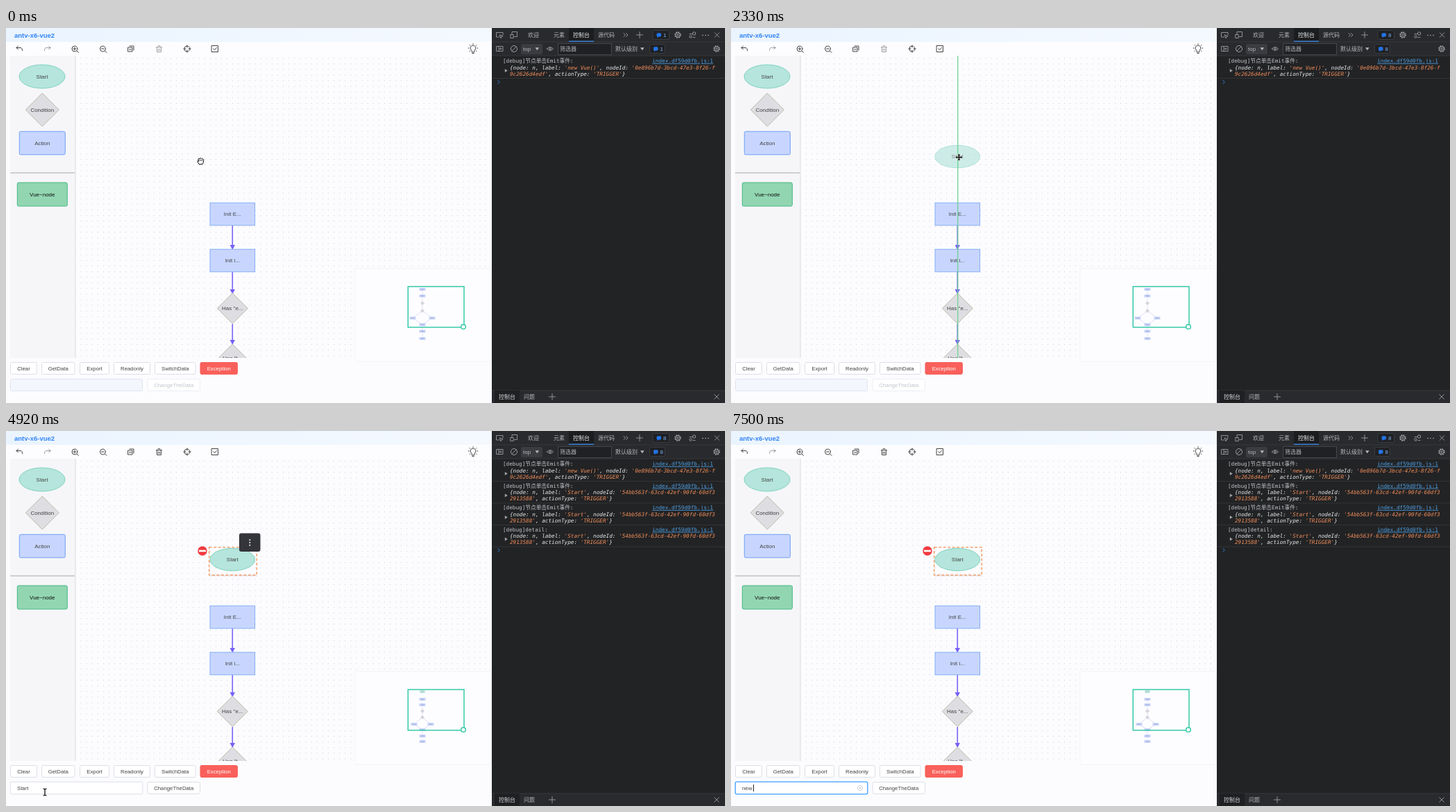
Animation, 1036 px wide and 541 px high, one loop 8000 ms. Source, as an HTML page:

```html
<!DOCTYPE html>
<html lang="en">
<head>
<meta charset="utf-8">
<title>antv-x6-vue2</title>
<style>
html, body { margin: 0; width: 100%; height: 100%; overflow: hidden; background: #fcfcff; }
svg { display: block; }
text { font-family: 'Liberation Sans', 'Noto Sans CJK SC', 'Noto Sans CJK', sans-serif; white-space: pre; }
.mono { font-family: 'DejaVu Sans Mono', 'Noto Sans CJK SC', 'Noto Sans CJK', monospace; }
.icon { fill: none; stroke: #444; stroke-width: 1; stroke-linecap: round; stroke-linejoin: round; }
.dark { stroke: #9a9da1; stroke-width: .9; }
</style>
</head>
<body>
<svg id="stage" width="1036" height="541" viewBox="0 0 1036 541" xmlns="http://www.w3.org/2000/svg"></svg>
<script>
const LOOP = 8000;
const BLUE = ['#c8d6ff', '#84aef5'], GRAY = ['#dedee2', '#b9b9a9'], MINT = ['#b5e5dc', '#7dd3bf'];

// Drawing helpers
const rect = (x, y, w, h, fill, stroke = 'none', r = 0, extra = '') =>
  `<rect x="${x}" y="${y}" width="${w}" height="${h}" rx="${r}" fill="${fill}" stroke="${stroke}" ${extra}/>`;
const circle = (x, y, r, fill, stroke = 'none', extra = '') =>
  `<circle cx="${x}" cy="${y}" r="${r}" fill="${fill}" stroke="${stroke}" ${extra}/>`;
const text = (x, y, s, fill = '#444', size = 8, extra = '') =>
  `<text x="${x}" y="${y + size * .35}" font-size="${size}" fill="${fill}" ${extra}>${s}</text>`;
const label = (x, y, s, fill, size) => text(x, y, s, fill, size, 'text-anchor="middle"');
const path = (d, cls = 'icon', extra = '') => `<path d="${d}" class="${cls}" ${extra}/>`;
const at = (x, y, body) => `<g transform="translate(${x} ${y})">${body}</g>`;
const group = (id, body, extra = '') => `<g id="${id}" ${extra}>${body}</g>`;

// Flow shapes
const box = (x, y, w, h, s, [fill, stroke] = BLUE, r = 0, ink = '#444') =>
  rect(x - w / 2, y - h / 2, w, h, fill, stroke, r) + label(x, y, s, ink);
const diamond = (x, y, r, s, labelY = y) =>
  `<path d="M${x} ${y - r}l${r} ${r}l${-r} ${r}l${-r} ${-r}z" fill="${GRAY[0]}" stroke="${GRAY[1]}"/>` + label(x, labelY, s);
const oval = (x, y, rx, ry, s, id = '') =>
  `<ellipse cx="${x}" cy="${y}" rx="${rx}" ry="${ry}" fill="${MINT[0]}" stroke="${MINT[1]}"/>` +
  (id ? group(id, label(x, y, s)) : label(x, y, s));
const edge = (y1, y2) =>
  `<path d="M326.3 ${y1}V${y2 - 5}" stroke="#7561f7" stroke-width="1.6"/>` +
  `<path d="M322.6 ${y2 - 7}h7.4l-3.7 7z" fill="#7561f7"/>`;

function header() {
  const undo = 'M-4 -1.5h6q2.5 0 2.5 4M-4 -1.5l2.5 -2.3M-4 -1.5l2.5 2.3';
  const lens = 'M3 3l2.5 2.5M4 0a4 4 0 1 1 -8 0a4 4 0 1 1 8 0M-2 0h4';
  return rect(0, 0, 700, 20, 'url(#bar)') + rect(0, 20, 700, 20, '#fdfdff') +
    text(12, 11, 'antv-x6-vue2', '#3385f5', 9.5, 'font-weight="600"') +
    at(19, 30, path(undo)) + at(60, 30, path(undo, 'icon', 'transform="scale(-1 1)" opacity=".5"')) +
    at(99, 30, path(lens + 'M0 -2v4')) + at(139.5, 30, path(lens)) +
    at(180, 30, path('M-4 -2h6v6h-6zM-2 -4h6v6M-2.5 1h3')) +
    group('trash', at(220.5, 30, path('M-4 -2.5h8M-1.5 -4.3h3M-3 -2.5v7h6v-7M-1 0v2.5M1 0v2.5'))) +
    at(261, 30, path('M4 0a4 4 0 1 1 -8 0a4 4 0 1 1 8 0M0 -5.2v3.2M0 5.2v-3.2M-5.2 0h3.2M5.2 0h-3.2')) +
    at(301, 30, path('M-4.5 -4.5h9v9h-9zM-2.2 -.2l1.7 1.8l3 -3.3')) +
    at(673, 30, path('M-1.8 4.5v-2.2a3.8 3.8 0 1 1 3.6 0v2.2zM-1.2 6.5h2.4M-6.8 -1h1M5.8 -1h1M-5 -5.5l.8 .8M5 -5.5l-.8 .8M0 -7.3v1M-5 3.5l.8 -.7M5 3.5l-.8 -.7'));
}

function palette() {
  return rect(99, 40, 2, 436, '#e9e9ee') + rect(6, 40, 93, 436, '#f6f6f9') +
    oval(52, 70, 33, 17, 'Start') + diamond(52.3, 118, 24, 'Condition') +
    box(52.3, 166, 66, 33.5, 'Action', ['#c8d6ff', '#6f9ff5'], 2) +
    rect(6, 208.5, 93, 1, '#a9a9ab') + box(52.3, 240, 72, 34, 'Vue−node', ['#92d6b1', '#45b883'], 2, '#111');
}

function flow() {
  return rect(101, 40, 598, 436, 'url(#dots)') +
    `<g clip-path="url(#canvas)">` + edge(285, 320) + edge(352, 384) + edge(427, 457) +
    box(326.3, 268.5, 64.5, 32.5, 'Init E...') + box(326.3, 335.5, 64.5, 32.5, 'Init i...') +
    diamond(326.3, 404.5, 22, 'Has "e...') + diamond(326.3, 478, 22, 'Has "t...', 476.5) + '</g>';
}

function miniature(start) {
  const ys = start ? [387, 395, 404, 413, 423, 431, 440, 448] : [377, 386.5, 397, 408, 418.5, 428, 437.5, 448];
  const dx = start ? 12 : 14;
  const chip = (x, y) => rect(x - 4.5, y - 2, 9, 4, '#c9d5fa') + rect(x - 2.5, y - .5, 5, 1, '#9ba9d5');
  const gem = y => `<path d="M600 ${y - 3}l3 3l-3 3l-3 -3z" fill="#d5d5dc"/>`;
  return `<path d="M600 ${ys[0]}V${ys[3]}M600 ${ys[5]}V${ys[7]}" stroke="#dcd8f8" stroke-width=".7"/>` +
    `<path d="M600 ${ys[3]}l${dx} ${ys[4] - ys[3]}l${-dx} ${ys[5] - ys[4]}l${-dx} ${ys[4] - ys[5]}z" fill="none" stroke="#d6d2f5" stroke-width=".7"/>` +
    (start ? `<ellipse cx="600" cy="376" rx="4" ry="2" fill="#b5dcd5"/>` : '') +
    chip(600, ys[0]) + chip(600, ys[1]) + gem(ys[2]) + gem(ys[3]) +
    chip(600 - dx, ys[4]) + chip(600 + dx, ys[4]) + [5, 6, 7].map(i => chip(600, ys[i])).join('');
}

function minimap() {
  return rect(503, 347, 196, 134, '#fdfdff', '#f3f3f7') +
    group('mapBefore', miniature(false)) + group('mapAfter', miniature(true)) +
    rect(579.3, 373, 80.7, 58.7, 'none', '#35c9a8', 0, 'stroke-width="1.5"') +
    circle(659, 431, 3.3, '#fff', '#35c9a8', 'stroke-width="1.5"');
}

function button(x, w, s, y = 482, colors = ['#fff', '#dcdfe6', '#444']) {
  return rect(x + .5, y + .5, w - 1, 17, colors[0], colors[1], 2) + label(x + w / 2, y + 9, s, colors[2], 7.8);
}

function footer() {
  return rect(0, 476, 503, 65, '#fcfcff') +
    button(6, 39, 'Clear') + button(51, 48.5, 'GetData') + button(106, 43, 'Export') +
    button(155, 53, 'Readonly') + button(214, 59.5, 'SwitchData') +
    button(279.5, 54.5, 'Exception', 482, ['#f9605b', '#f9605b', '#fff']) +
    group('idle', rect(6.5, 506.5, 190, 17, '#f3f6fd', '#dfe4f0', 2) +
      button(203.5, 76.5, 'ChangeTheData', 506, ['#fff', '#ebeef5', '#c0c4cc'])) +
    group('active', rect(6.2, 506.2, 190.6, 17.6, '#fff', 'none', 2, 'id="field"') +
      button(203.5, 76.5, 'ChangeTheData', 506) +
      rect(16, 506.8, 17, 16.5, '#b4d6fd', 'none', 0, 'id="highlight"') +
      `<text id="value" x="16" y="517.9" font-size="7.8" fill="#444"></text>` +
      rect(0, 510, 1, 10, '#222', 'none', 0, 'id="caret"') +
      group('clear', circle(186, 515, 3.6, 'none', '#c0c4cc', 'stroke-width=".8"') +
        path('M184.7 513.7l2.6 2.6M187.3 513.7l-2.6 2.6', 'icon', 'style="stroke:#c0c4cc;stroke-width:.8"')));
}

function logEntry(i, title, lines) {
  const y = 47.5 + i * 31.5, mono = 'class="mono"';
  const paint = (s, re) => s.replace(re, m => `<tspan fill="#f28f5b">${m}</tspan>`);
  const row = (dy, s) => text(726, y + dy, s, '#e8eaec', 7.68, mono + ' font-style="italic"');
  return group('log' + i, text(716, y, title, '#c0c3c7', 7.68, mono) +
    text(1019, y, 'index.df59d0fb.js:1', '#4f9fe3', 7.68, mono + ' text-anchor="end" text-decoration="underline"') +
    `<path d="M718.8 ${y + 11.5}l4 2.5l-4 2.5z" fill="#a0a3a7"/>` +
    row(9.5, paint(lines[0], /'[^']*('|$)/g)) + row(18.5, paint(lines[1], /^[^']*'|'[^']*'/g)) +
    rect(700, y + 24.5, 336, 1, '#323437'));
}

function devtools() {
  const d = 'icon dark', ink = '#b4b7bb';
  const gear = circle(0, 0, 3.9, 'none', '#9a9da1', 'stroke-width="1.8" stroke-dasharray="1.8 1.26"') +
    circle(0, 0, 3.2, 'none', '#9a9da1', 'stroke-width=".9"') + circle(0, 0, 1.2, 'none', '#9a9da1', 'stroke-width=".9"');
  const cross = path('M-3.3 -3.3l6.6 6.6M3.3 -3.3l-6.6 6.6', d), plus = path('M-4.5 0h9M0 -4.5v9', d);
  const badge = (x, y, w) => rect(x + .5, y - 6.5, w, 13, '#202124', '#3a3d41', 2) +
    rect(x + 6, y - 2.8, 6.5, 5.2, '#2274e8', 'none', 1.5) + `<path d="M${x + 7} ${y + 1}v3l3 -2z" fill="#2274e8"/>` +
    text(x + 15.5, y + .2, '', '#7fb2f5', 8, 'data-count="1"');
  const clicked = '[debug]节点单击Emit事件:';
  const start = ["{node: n, label: 'Start', nodeId: '54bb563f-63cd-42ef-90fd-60df3", "2913588', actionType: 'TRIGGER'}"];
  return rect(700, 0, 336, 541, '#222325') + rect(700, 0, 336, 40, '#292a2d') +
    rect(700, 19.5, 336, 1, '#37393c') + rect(700, 39.5, 336, 1, '#37393c') +
    rect(811, 0, 36, 19, '#1c1d1f') + rect(811, 18.5, 36, 1.3, '#3f8cf0') +
    at(711.5, 10, path('M-1 3h-4v-6.5h9.5v3.5M0 0l4.5 1.7l-2 .8l-.8 2z', d)) +
    at(732, 10, path('M-3 -1v-3.5h7.5v7h-4M-4.8 -.5h4v5h-4z', d)) +
    text(752, 10, '欢迎', ink) + text(789, 10, '元素', ink) + text(817, 10, '控制台', '#e3e5e8') + text(853, 10, '源代码', ink) +
    at(893, 10, path('M-3 -2.5l2.5 2.5l-2.5 2.5M.5 -2.5l2.5 2.5l-2.5 2.5', d)) + at(913, 10, plus) +
    badge(931.5, 10, 23.5) + at(968, 10, gear) +
    at(989, 10, circle(2.5, -2, 2.2, 'none', '#9a9da1') + circle(-2.5, 2.5, 1.7, 'none', '#9a9da1') + path('M-4 -1.5h3.5M1 3.5h3', d)) +
    [1004, 1008, 1012].map(x => circle(x, 10.5, .8, ink)).join('') + at(1024.5, 10, cross) +
    at(711.5, 30, path('M-4.5 -3.5h9v7h-9zM-1.5 -3.5v7M3 0h-3M1.3 -1.4l-1.3 1.4l1.3 1.4', d)) +
    at(732, 30, circle(0, 0, 4.5, 'none', '#9a9da1') + path('M-3 3l6 -6', d)) +
    rect(742, 23, 31, 15, '#3a3c40', 'none', 2) + text(745, 30, 'top', ink) + `<path d="M762.5 28.3h5.6l-2.8 4z" fill="${ink}"/>` +
    at(784, 30, path('M-4.5 0q4.5 -5 9 0q-4.5 5 -9 0z', d) + circle(0, 0, 1.4, 'none', '#9a9da1')) +
    rect(795.5, 22.5, 77, 16, '#202124', '#44474c') + text(798, 30.3, '筛选器', ink) +
    text(878, 30, '默认级别', ink) + `<path d="M914 28.3h5.6l-2.8 4z" fill="${ink}"/>` +
    badge(927, 30, 22) + at(1024, 30, gear) +
    logEntry(0, clicked, ["{node: n, label: 'new Vue()', nodeId: '0e896b7d-3bcd-47e3-8f26-f", "9c2626d4edf', actionType: 'TRIGGER'}"]) +
    logEntry(1, clicked, start) + logEntry(2, clicked, start) + logEntry(3, '[debug]detail:', start) +
    group('prompt', path('M708.8 -2.5l2.5 2.5l-2.5 2.5', 'icon', 'style="stroke:#3579d0"')) +
    rect(700, 523, 336, 18, '#292a2d') + rect(700, 522.5, 336, 1, '#37393c') + rect(704, 523, 36, 18, '#1f2022') +
    text(710, 532, '控制台', '#d0d3d7') + text(746, 532, '问题', ink) + at(787, 532, plus) + at(1024, 532, cross);
}

function startNode() {
  return group('node', oval(326.3, 185.5, 32.3, 16.2, 'Start')) +
    group('selected', rect(293, 208, 69, 1.5, '#dfdfe6') +
      rect(292.7, 167.7, 68.6, 40, '#fff', '#f5a06a', 0, 'fill-opacity="0" stroke-width="1.5" stroke-dasharray="4 2.5"') +
      circle(283, 173, 6.7, '#f03a3f') + rect(278, 171.7, 10, 2.6, '#fff')) +
    circle(326.3, 201.5, 3.7, '#fff', '#78a5f2', 'id="port"') +
    group('menu', rect(336, 147.5, 30.5, 26.5, '#34353a', 'none', 3) +
      [157.2, 161, 164.8].map(y => circle(351.3, y, 1, '#fff')).join(''));
}

function cursors() {
  const outline = 'stroke="#fff" stroke-width="1" paint-order="stroke" stroke-linejoin="round"';
  const solid = d => `<path d="${d}" fill="#111" ${outline}/>`;
  const cross = 'M0 -5l2 2.2h-1.2v2h2v-1.2l2.2 2l-2.2 2v-1.2h-2v2h1.2l-2 2.2l-2 -2.2h1.2v-2h-2v1.2l-2.2 -2l2.2 -2v1.2h2v-2h-1.2z';
  return group('hand', `<path d="M-2.5 4.5l-2.3 -4.2q.3 -1.5 1.6 -.2l.3 .5l-.8 -3.4q.8 -1.5 1.6 .1q.2 -2 1.6 -1.2q1 -1.2 1.8 .5q1.4 -1 1.7 .8q1.4 -.4 1.3 1.3l-.6 3.5l-1 2.3z" fill="#fff" stroke="#111"/><path d="M-1.4 -2v2.2M.4 -2.5v2.5M2.2 -2v2.2" stroke="#111" stroke-width=".7"/>`) +
    group('move', solid(cross)) +
    group('arrow', solid('M-1.5 -5.5v9l2.1 -1.9l1.5 3.4l1.5 -.7l-1.5 -3.2h2.8z')) +
    group('beam', path('M-2 -4.8q2 0 2 1.2q0 -1.2 2 -1.2M0 -3.6v7.2M-2 4.8q2 0 2 -1.2q0 1.2 2 1.2', 'icon', 'style="stroke:#111;stroke-width:1.3"'));
}

const stage = document.getElementById('stage');
stage.innerHTML = `<defs>
  <linearGradient id="bar"><stop stop-color="#eaf4ff"/><stop offset="1" stop-color="#f4f9ff"/></linearGradient>
  <pattern id="dots" x="2.2" y="2.7" width="8.1" height="8.1" patternUnits="userSpaceOnUse"><rect width="1" height="1" fill="#c9c9d1"/></pattern>
  <clipPath id="canvas"><rect x="101" y="40" width="598" height="436"/></clipPath></defs>` +
  rect(0, 0, 700, 541, '#fcfcff') + header() + flow() + minimap() + palette() + startNode() + footer() +
  group('ghost', oval(0, 0, 32.3, 16.2, 'Start', 'ghostLabel'), 'opacity=".65"') +
  rect(0, 40, 1.2, 436, '#62d08a', 'none', 0, 'id="snap"') + devtools() + group('cursor', cursors());

const $ = id => document.getElementById(id);
const show = (id, on) => { $(id).style.display = on ? '' : 'none'; };
const last = (steps, t) => steps.filter(s => s[0] <= t).pop();
const place = (id, x, y) => $(id).setAttribute('transform', `translate(${x} ${y})`);

// Tables of [time, value...]
const POINTER = [
  [0, 'hand', 280.5, 192], [170, 'hand', 262, 181], [250, 'hand', 215, 152], [330, 'hand', 160, 118], [420, 'hand', 108, 89],
  [500, 'move', 70, 69], [580, 'move', 53, 62], [670, 'move', 47, 60], [920, 'move', 52, 64], [1000, 'move', 66.5, 74],
  [1080, 'move', 100, 88], [1170, 'move', 150, 110], [1250, 'move', 205, 133], [1330, 'move', 252, 148], [1420, 'move', 287, 157],
  [1500, 'move', 308.5, 160.5], [1670, 'move', 309, 161], [1750, 'move', 311, 164], [1830, 'move', 314, 168], [1920, 'move', 317, 172],
  [2000, 'move', 320, 176], [2080, 'move', 323, 180], [2170, 'move', 326, 183], [2250, 'move', 328, 185], [2330, 'move', 328.5, 186.5],
  [2750, 'arrow', 328.5, 187.5], [4170, 'arrow', 323, 197], [4250, 'hand', 305, 230], [4330, 'hand', 270, 285], [4420, 'hand', 228, 345],
  [4500, 'hand', 188, 400], [4580, 'hand', 153, 442], [4670, 'arrow', 121, 475], [4750, 'arrow', 94, 498], [4830, 'beam', 70, 513],
  [4920, 'beam', 56, 521], [5000, 'beam', 52, 519], [5080, 'beam', 49, 518], [5170, 'beam', 47, 517], [5330, 'beam', 46, 516], [6670, '', 0, 0]
];
const COUNT = [[0, 1], [420, 3], [500, 5], [670, 7], [920, 8]];
const SNAP = [[0, 0], [1500, 342.5], [1920, 0], [2080, 326.3], [2670, 0]];
const VALUE = [[0, 'Start'], [6670, ''], [7080, 'n'], [7170, 'ne'], [7330, 'new'], [7500, 'new ']];
const CARET = [[0, 0], [5420, 32], [5920, 0], [6420, 32], [6500, 0], [6670, 16], [7080, 20.5], [7170, 24.5], [7330, 30], [7500, 32]];

function ghostPosition(t) {
  if (t < 1080) return [46.8, 60];
  const [, , x, y] = last(POINTER, t), snap = last(SNAP, t)[1];
  const gx = snap === 342.5 ? 310.3 : snap || x + 1;
  return [gx, t < 1420 ? y : t < 2330 ? y - 2.5 : 185.5];
}

function render(t) {
  const [, kind, x, y] = last(POINTER, t);
  for (const id of ['hand', 'move', 'arrow', 'beam']) show(id, id === kind);
  place('cursor', x, y);

  show('ghost', t >= 670 && t < 2670);
  show('ghostLabel', t >= 1080);
  place('ghost', ...ghostPosition(t));
  const snap = last(SNAP, t)[1];
  show('snap', snap);
  $('snap').setAttribute('x', snap - .1);

  show('node', t >= 2670);
  show('mapBefore', t < 2670);
  show('mapAfter', t >= 2670);
  show('port', t >= 2750 && t < 4250);
  const picked = t >= 3750;
  show('selected', picked);
  show('menu', t >= 3920 && t < 5000);
  $('trash').setAttribute('opacity', picked ? 1 : .5);

  const logs = t < 3750 ? 1 : t < 3830 ? 2 : t < 3920 ? 3 : 4;
  for (let i = 1; i < 4; i++) show('log' + i, i < logs);
  place('prompt', 0, 46.8 + logs * 31.3);
  for (const el of document.querySelectorAll('[data-count]')) el.textContent = last(COUNT, t)[1];

  show('idle', !picked);
  show('active', picked);
  const focus = t >= 5420;
  $('field').setAttribute('stroke', focus ? '#409eff' : '#dcdfe6');
  $('field').setAttribute('stroke-width', focus ? 1.3 : 1);
  $('value').textContent = last(VALUE, t)[1];
  show('highlight', t >= 6500 && t < 6670);
  show('clear', t >= 5000 && (t < 6750 || t >= 7080));
  const caret = last(CARET, t)[1];
  show('caret', caret);
  $('caret').setAttribute('x', caret);
}

const begin = performance.now();
function tick() {
  render((performance.now() - begin) % LOOP);
  requestAnimationFrame(tick);
}
tick();
</script>
</body>
</html>
```
